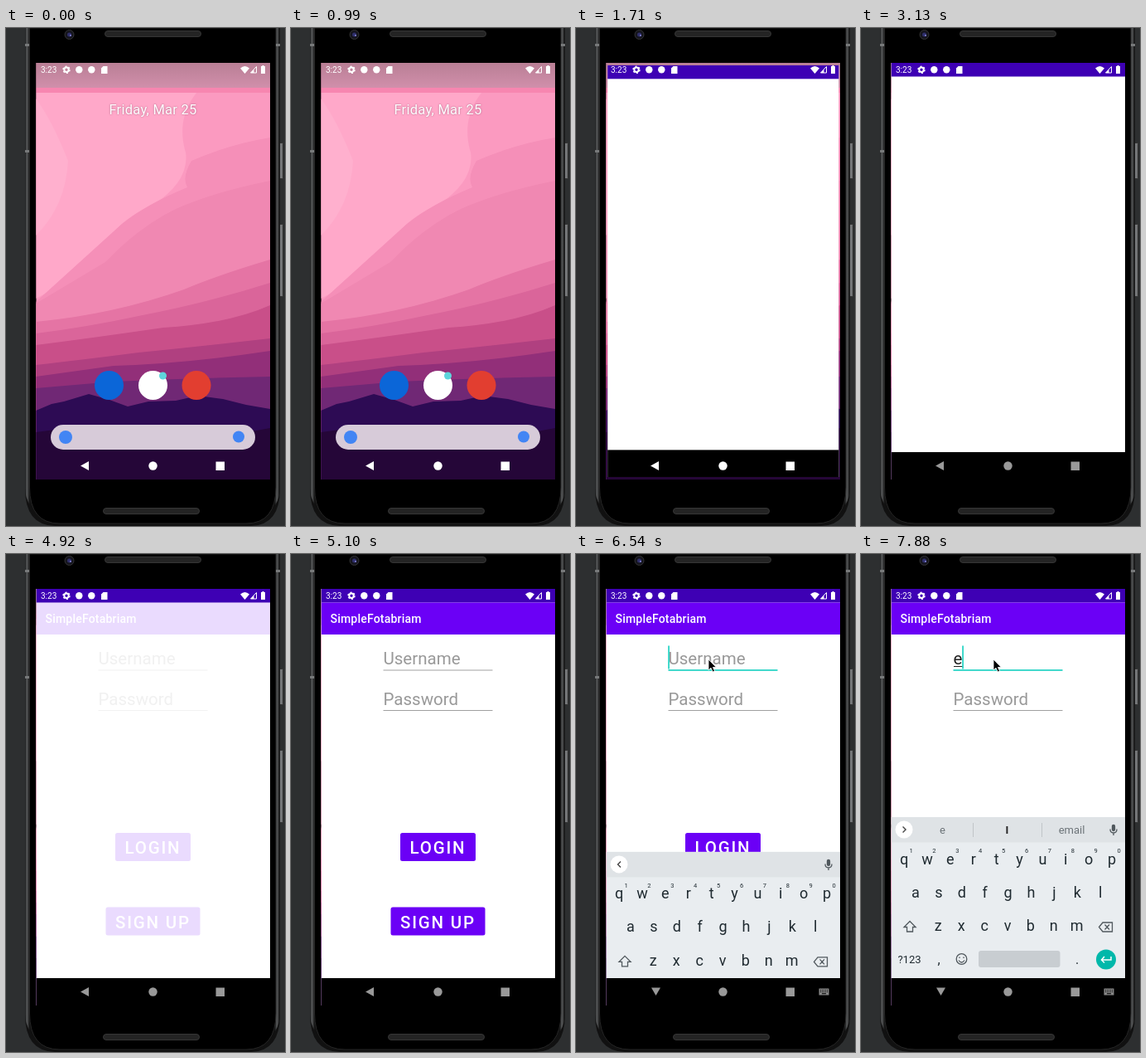
These frames come from a looping animation (337x600 px, 8 s). An HTML page:

```html
<!DOCTYPE html>
<html lang="en">
<head>
<meta charset="utf-8">
<title>Phone login</title>
<style>
  html, body { margin: 0; width: 100%; height: 100%; overflow: hidden; background: #2d2f30; }
  svg { display: block; width: 100%; height: 100%; font-family: Roboto, sans-serif; }
  .mid { text-anchor: middle; }
</style>
</head>
<body>
<svg viewBox="0 0 337 600">
  <defs>
    <clipPath id="screen"><rect x="36.5" y="42" width="282.5" height="502"/></clipPath>
    <clipPath id="aboveNav"><rect x="36.5" y="42" width="282.5" height="469"/></clipPath>
    <linearGradient id="metal">
      <stop offset="0" stop-color="#161718"/><stop offset=".35" stop-color="#5b5d5e"/>
      <stop offset="1" stop-color="#0a0a0a"/>
    </linearGradient>
    <linearGradient id="scrim" x2="0" y2="1">
      <stop offset="0" stop-color="#b97f95"/><stop offset="1" stop-color="#d18fab"/>
    </linearGradient>
  </defs>

  <!-- phone body -->
  <rect width="337" height="600" fill="#2d2f30"/>
  <g fill="#747678" stroke="#333">
    <rect x="329.5" y="138.500" width="5" height="43" rx="1"/>
    <rect x="329.5" y="236.500" width="5" height="87" rx="1"/>
  </g>
  <path d="M23 0H331V555Q331 599 296 600H59Q23 599 23 555Z" fill="#111"/>
  <path d="M23 0H29V575Q23 565 23 555Z" fill="url(#metal)"/>
  <path d="M325 0H331V555Q331 565 325 575Z" fill="url(#metal)"/>
  <path d="M28.500 0H326V553Q326 597 290 597H65Q28.500 597 28.500 553Z" stroke="#252525"/>
  <path d="M23 20.500H28M23 148.500H28M326 20.500H331" stroke="#77797a" stroke-width="3"/>
  <g fill="#242424" stroke="#363636">
    <rect x="119.500" y="3.500" width="116" height="7" rx="3.500"/>
    <rect x="117.500" y="578.500" width="116" height="7" rx="3.500"/>
  </g>
  <circle cx="76.500" cy="8" r="5.500" fill="#15151d" stroke="#333"/>
  <circle cx="76.500" cy="8" r="2.500" fill="#30306c"/>
  <circle cx="78" cy="9" r="1" fill="#8585d8"/>

  <g clip-path="url(#screen)">
    <g id="home">
      <rect x="36" y="42" width="284" height="502" fill="#fb9ac0"/>
      <g id="hills"></g>
      <rect x="36" y="42" width="284" height="30" fill="url(#scrim)"/>
      <rect x="36" y="72" width="284" height="6" fill="#f786b0"/>
      <text class="mid" x="177.500" y="103.500" font-size="16.500" letter-spacing=".25" fill="#fff"
        style="text-shadow:0 0 2px #804060b0">Friday, Mar 25</text>
      <circle cx="124.500" cy="430.500" r="17.500" fill="#0b66d8"/>
      <circle cx="177.500" cy="430.500" r="17.500" fill="#fff"/>
      <circle cx="230" cy="430.500" r="17.500" fill="#e23e30"/>
      <circle cx="189.500" cy="419" r="4.500" fill="#5ed5dc"/>
      <rect x="54" y="478" width="247" height="30" rx="15" fill="#d7cbd9"/>
      <circle cx="72" cy="493" r="8" fill="#4285f4"/>
      <circle cx="281" cy="492.500" r="7" fill="#4285f4"/>
    </g>

    <g id="window">
      <rect x="36.500" y="42" width="282.500" height="502" fill="#fff"/>
      <rect x="36.500" y="42" width="282.500" height="16.500" fill="#3e00b4"/>
      <rect x="36.500" y="511" width="282.500" height="33"/>
    </g>

    <g id="app">
      <rect x="36.500" y="58.500" width="282.500" height="38.500" fill="#6b00f6"/>
      <text x="47.500" y="83" font-size="14" font-weight="500" letter-spacing=".2" fill="#fff">SimpleFotabriam</text>
      <g font-size="20.500" fill="#999">
        <text id="hint" x="111.500" y="132.500">Username</text>
        <text x="111.500" y="181.500">Password</text>
      </g>
      <g id="typed">
        <text x="111.500" y="132.500" font-size="20.500" fill="#222">e</text>
        <path d="M112 135.500H122.500" stroke="#222"/>
      </g>
      <path id="userLine" d="M111.500 140H243.500"/>
      <path d="M111.500 188.500H243.500" stroke="#a0a0a0"/>
      <rect id="caret" y="110.500" width="1.500" height="28" fill="#03cdbb"/>
      <g fill="#6b00f6">
        <rect x="132" y="336" width="91" height="34" rx="2.500"/>
        <rect x="120.500" y="425.500" width="114" height="34" rx="2.500"/>
      </g>
      <g font-size="20.500" font-weight="500" letter-spacing="1.800" fill="#fff">
        <text x="143.500" y="361">LOGIN</text>
        <text x="132" y="450.500">SIGN UP</text>
      </g>
    </g>

    <g clip-path="url(#aboveNav)"><g id="keyboard">
      <rect x="36" y="317" width="284" height="195" fill="#e9edf0"/>
      <rect x="36" y="317" width="284" height="30.500" fill="#dfe3e6"/>
      <circle cx="52" cy="332" r="10.500" fill="#fff"/>
      <path id="chevron" fill="none" stroke="#444" stroke-width="1.400"/>
      <g id="suggestions" class="mid" font-size="13" fill="#6c7378">
        <path d="M135.500 324V341M218.500 324V341" stroke="#c0c5c8"/>
        <text x="98.500" y="337">e</text>
        <text x="176.500" y="337" font-weight="700" fill="#222">I</text>
        <text x="254.500" y="337">email</text>
      </g>
      <g fill="none" stroke="#50585d" stroke-width="1.300">
        <rect x="303.500" y="326.500" width="3" height="7" rx="1.500" fill="#50585d"/>
        <path d="M301 331.500Q301 336 305 336T309 331.500M305 336V339"/>
        <path d="M59 442.500L66 449.500H62.500V455H55.500V449.500H52Z"/>
        <path d="M287.500 449.500L292 444H303.500V455H292ZM294.500 446.500L300 452.500M300 446.500L294.500 452.500"/>
        <circle cx="121.500" cy="488" r="6.300"/>
        <path d="M118 489.500Q121.500 494.500 125 489.500M119 485.500V487M124 485.500V487"/>
      </g>
      <g id="keys" class="mid" fill="#1f2a30"></g>
      <rect x="142" y="478" width="98.500" height="20" rx="3" fill="#c8cdd1"/>
      <circle cx="296" cy="488.500" r="12" fill="#00b8aa"/>
      <path d="M302 485V489H290.500M294 485L290.500 489L294 492.500" fill="none" stroke="#fff" stroke-width="1.500"/>
    </g></g>

    <g id="nav">
      <path id="back"/>
      <circle cx="177.500" cy="527.500" r="5.200"/>
      <rect x="253.500" y="522.500" width="10.500" height="10.500"/>
    </g>
    <g id="imeIcon">
      <rect x="293.500" y="523.500" width="12" height="8" fill="#858585"/>
      <path d="M295 525.500H304M295 527.500H304" stroke="#000" stroke-dasharray="1 1"/>
      <path d="M297 529.700H302" stroke="#000"/>
    </g>

    <!-- status bar -->
    <g fill="#fff">
      <text x="42" y="54" font-size="10">3:23</text>
      <circle cx="73" cy="50.300" r="2.700" fill="none" stroke="#fff" stroke-width="2"/>
      <circle cx="73" cy="50.300" r="4" fill="none" stroke="#fff" stroke-width="1.400" stroke-dasharray="2.100 2.090"/>
      <circle cx="88.300" cy="50.300" r="4.200"/>
      <circle cx="103.300" cy="50.300" r="4.200"/>
      <path d="M117.500 46H122.500V55H115V48.500Z"/>
      <path d="M283 48.500Q288.500 43.500 294 48.500L288.500 55Z"/>
      <path d="M302.500 46.500V54H295.500Z" fill="none" stroke="#fff"/>
      <path d="M299.500 50V54H295.500Z"/>
      <path d="M308 46H309.500V45H311.500V46H313V55H308Z"/>
    </g>
  </g>

  <path id="pointer" d="M0 0V13L3 10.300L5.200 15L7.500 14L5.400 9.500H9.300Z" stroke="#fff" stroke-width=".8"/>
</svg>

<script>
const $ = id => document.getElementById(id);
const LOOP = 8000, STEP = 90;

// Wallpaper layers from back to front: colour and upper edge.
const hills = [
  ['#ffa8c9', 'M36 78H230Q205 110 217 150Q222 185 175 215C120 235 110 290 36 326'],
  ['#ffb0ce', 'M36 85Q55 110 75 160Q72 215 36 250'],
  ['#f58fb8', 'M319 132Q270 140 224 160Q212 180 219 192Q170 212 140 236L36 330V544H319'],
  ['#f088b2', 'M319 184Q250 198 205 218Q160 240 120 282L36 332V544H319'],
  ['#e574a4', 'M319 279Q255 298 215 315Q130 345 36 354V544H319'],
  ['#da659a', 'M319 307Q240 332 160 347Q100 360 36 368V544H319'],
  ['#c94f89', 'M319 334Q270 356 190 361Q100 374 36 382V544H319'],
  ['#b04080', 'M319 374Q230 384 160 391Q90 400 36 406V544H319'],
  ['#922f79', 'M319 389Q220 404 130 407L36 420V544H319'],
  ['#702875', 'M319 420Q220 422 130 426L36 434V544H319'],
  ['#2d0b54', 'M36 461L55 453L70 450L100 441L125 448L147 456L172 450L205 449L232 443L262 447L290 454L319 459V544H36'],
  ['#250638', 'M36 487Q110 476 180 486T319 482V544H36'],
];
$('hills').innerHTML = hills.map(([color, d]) => `<path fill="${color}" d="${d}Z"/>`).join('');

const key = (label, x, y, size = 18) => `<text x="${x}" y="${y}" font-size="${size}">${label}</text>`;
const row = (letters, x, y) => [...letters].map((c, i) => key(c, x + i * 27.9, y)).join('');
$('keys').innerHTML =
  row('qwertyuiop', 52, 373.5) + row('asdfghjkl', 66, 413.5) + row('zxcvbnm', 93.3, 454) +
  [...'1234567890'].map((c, i) => key(c, 60.5 + i * 27.9, 360, 7.5)).join('') +
  key('?123', 58.5, 493, 13) + key(',', 94, 493.5, 16) + key('.', 261, 493.5, 16);

const show = (id, visible) => $(id).style.display = visible ? '' : 'none';
const set = (id, name, value) => $(id).setAttribute(name, value);
const clamp = v => Math.min(1, Math.max(0, v));
const easeOut = p => 1 - (1 - p) ** 3;
const stepsSince = (t, start) => Math.floor((t - start) / STEP);

// Last value whose start time has been reached.
const at = (t, stops) => stops.filter(([start]) => t >= start).pop()[1];

function render(t) {
  const scale = at(t, [[0, 0], [1530, .76], [1710, .988], [1800, 1]]);
  show('window', scale);
  set('window', 'opacity', t < 1710 ? .16 : 1);
  set('window', 'transform', `translate(177.75 293) scale(${scale}) translate(-177.75 -293)`);

  const navGray = at(t, [[0, 255], [2150, 240], [2330, 222], [2510, 202], [2680, 182], [2860, 166], [3130, 153]]);
  set('nav', 'fill', `rgb(${navGray},${navGray},${navGray})`);

  show('app', t >= 4920);
  set('app', 'opacity', at(t, [[0, 0], [4920, .14], [5010, .65], [5100, 1]]));

  const travel = easeOut(clamp(stepsSince(t, 5640) / 6));
  show('pointer', t >= 5640);
  set('pointer', 'transform', `translate(${6 + 154 * travel} ${215 - 88 * travel})`);

  const focused = t >= 6360, typed = t >= 7790;
  set('userLine', 'stroke', focused ? '#03cdbb' : '#a0a0a0');
  set('userLine', 'stroke-width', focused ? 1.5 : 1);
  show('imeIcon', focused);
  show('hint', !typed);
  show('typed', typed);
  show('caret', focused && (t < 6810 || t >= 7340));
  set('caret', 'x', typed ? 122.3 : 111.3);

  const rise = easeOut(clamp((stepsSince(t, 6450) + 1) / 5));
  show('keyboard', t >= 6450);
  set('keyboard', 'transform', `translate(0 ${194 * (1 - rise)})`);
  set('back', 'd', t >= 6540 ? 'M91 522.5H102L96.500 532Z' : 'M90 527.500L100 522V533Z');

  const suggesting = t >= 7880;
  show('suggestions', suggesting);
  set('chevron', 'd', suggesting ? 'M50.500 328.500L54 332L50.500 335.500' : 'M54 328.500L50.500 332L54 335.500');
}

const start = performance.now();
function frame() {
  render((performance.now() - start) % LOOP);
  requestAnimationFrame(frame);
}
frame();
</script>
</body>
</html>
```
